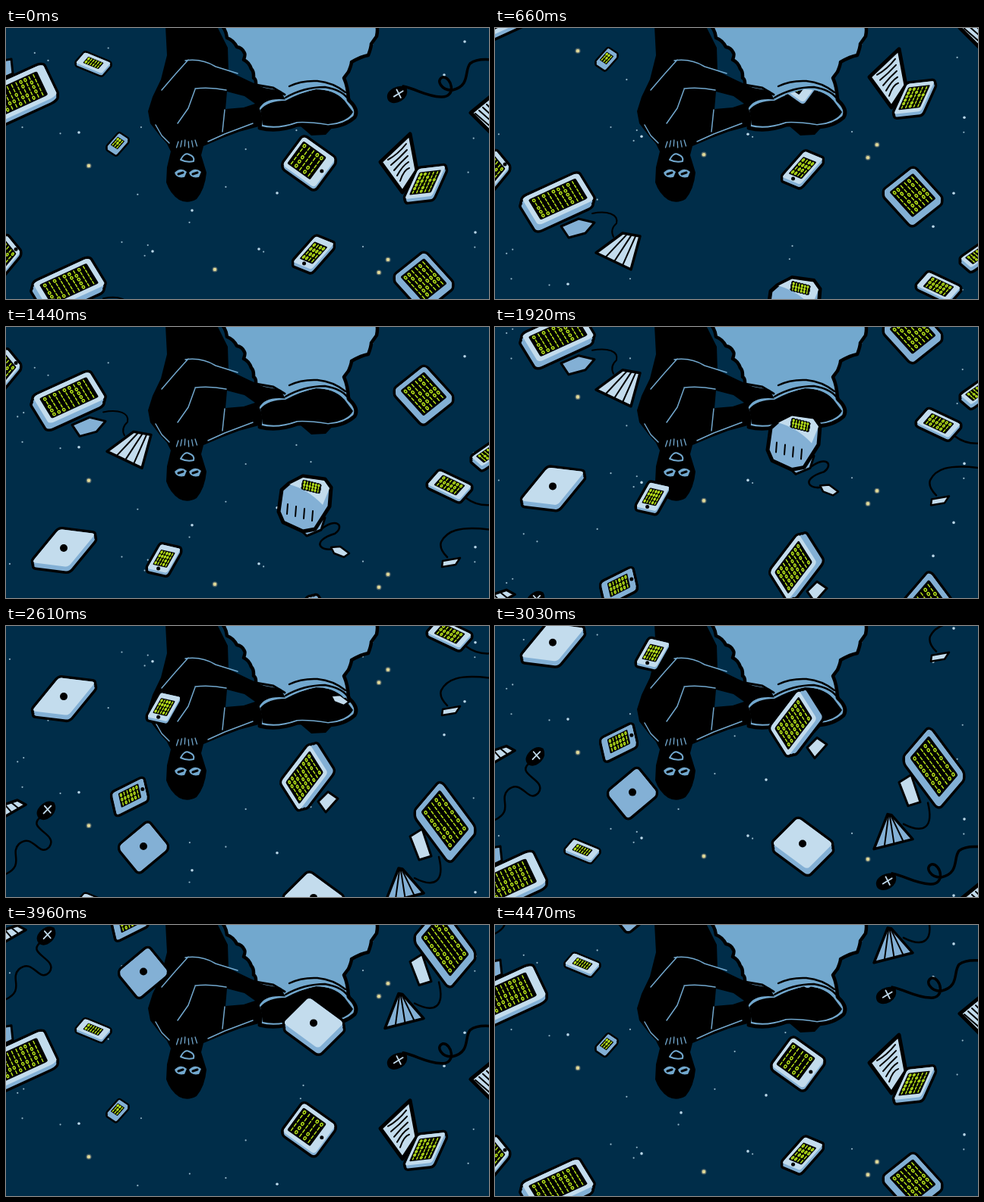
An HTML page with a canvas that plays this animation: 636x358 px, repeating every 4.5 s.

```html
<!DOCTYPE html>
<html lang="en">
<head>
<meta charset="utf-8">
<style>
html, body { margin: 0; width: 100%; height: 100%; overflow: hidden; background: #002d49; }
canvas { display: block; }
</style>
</head>
<body>
<canvas id="stage" width="636" height="358"></canvas>
<script>
const ctx = document.getElementById('stage').getContext('2d');
const LOOP = 4500, STEP = 30;
const ITEM_SPEED = 0.17, STAR_SPEED = 0.23;
const NIGHT = '#002d49', LIGHT = '#c3dced', BLUE = '#83b0d5', SACK = '#72a8ce', GREEN = '#b5e01a';
ctx.lineCap = ctx.lineJoin = 'round';

function seeded(seed) {
  return () => (seed = seed * 16807 % 2147483647) / 2147483647;
}
function fill(color, d) {
  ctx.fillStyle = color;
  ctx.fill(new Path2D(d));
}
function line(d, width = 2, color = '#000') {
  ctx.strokeStyle = color;
  ctx.lineWidth = width;
  ctx.stroke(new Path2D(d));
}
function shape(color, d, width = 4) {
  fill(color, d);
  line(d, width);
}
function dot(x, y, r, color = '#000') {
  ctx.fillStyle = color;
  ctx.beginPath();
  ctx.arc(x, y, r, 0, 7);
  ctx.fill();
}

// Builds a path in the square -1..1 spanned by the half axes u and v around (x, y)
function trace(x, y, u, v, build) {
  ctx.save();
  ctx.transform(...u, ...v, x, y);
  ctx.beginPath();
  build();
  ctx.restore();
}

function traceBits(rows, cols, w, h, shift) {
  const random = seeded(rows * 911 + cols * 37);
  for (let i = 0; i < rows * cols; i++) {
    const x = shift + w * ((i % cols * 2 + 1) / cols - 1) * 0.93;
    const y = h * ((Math.floor(i / cols) * 2 + 1) / rows - 1) * 0.93;
    const rx = w * 0.42 / cols, ry = h * 0.56 / rows;
    if (random() < 0.4) {
      ctx.moveTo(x + rx, y);
      ctx.ellipse(x, y, rx, ry, 0, 0, 2 * Math.PI);
    } else {
      ctx.moveTo(x, y - ry);
      ctx.lineTo(x, y + ry);
    }
  }
}

// A flat device: rounded face, side of the given depth, and a screen full of bits
function slab(x, y, u, v, { face = LIGHT, depth = [0, 3], bits, size = [0.8, 0.75], shift = 0, button, mark, edge = 4 } = {}) {
  const body = k => trace(x + depth[0] * k, y + depth[1] * k, u, v, () => ctx.roundRect(-1, -1, 2, 2, 0.18));
  const layers = [1, 0.5, 0];
  ctx.strokeStyle = '#000';
  ctx.lineWidth = edge * 2 - 1;
  for (const k of layers) { body(k); ctx.stroke(); }
  ctx.fillStyle = BLUE;
  for (const k of layers) { body(k); ctx.fill(); }
  ctx.fillStyle = face;
  ctx.fill();
  if (bits) {
    const [w, h] = size;
    trace(x, y, u, v, () => ctx.roundRect(shift - w, -h, 2 * w, 2 * h, 0.08));
    ctx.fillStyle = '#000';
    ctx.fill();
    trace(x, y, u, v, () => traceBits(...bits, w, h, shift));
    ctx.strokeStyle = GREEN;
    ctx.lineWidth = 1.5;
    ctx.stroke();
  }
  if (button) dot(x + u[0] * button[0] + v[0] * button[1], y + u[1] * button[0] + v[1] * button[1], 2.5);
  if (mark) dot(x, y, 5);
}

// Keyboard seen at an angle: stripes fan out from the short edge ab to the long edge dc
function keyboard(color, a, b, c, d) {
  const mix = (p, q, k) => [p[0] + (q[0] - p[0]) * k, p[1] + (q[1] - p[1]) * k];
  shape(color, `M${a}L${b}L${c}L${d}Z`, 3.5);
  for (const k of [0.27, 0.52, 0.76]) line(`M${mix(a, b, k)}L${mix(d, c, k)}`, 2);
}

function mouse(x, y, angle) {
  ctx.save();
  ctx.translate(x, y);
  ctx.rotate(angle);
  shape('#000', 'M-13 0Q-12 -9 0 -9Q12 -8 14 0Q11 9 0 9Q-12 8 -13 0Z', 2);
  line('M3 -6L2 6M-5 0L9 0', 1.8, LIGHT);
  ctx.restore();
}

// Each piece is drawn where it stands at the given moment of the loop
const pieces = [
  [0, () => {
    shape(BLUE, 'M-4 43L7 41L9 60L-4 66Z', 3);
    slab(8, 91, [50, -23], [10, 21], { depth: [0, 5], bits: [5, 13] });
  }],
  [0, () => slab(115, 46, [17, 7], [-6, 7], { bits: [2, 6], size: [0.6, 0.6], edge: 3 })],
  [0, () => slab(147, 152, [6, 4], [-8, 9], { face: BLUE, bits: [3, 3], size: [0.75, 0.6], edge: 3 })],
  [0, () => {
    line('M523 77C542 81 552 90 573 91C594 92 587 64 575 65C565 69 574 83 588 82C612 76 603 57 611 47Q620 40 640 42', 3.5);
    mouse(515, 88, -0.55);
  }],
  [0, () => slab(399, 177, [21, 15], [-14, 19], { bits: [5, 5], size: [0.72, 0.78], shift: -0.14, button: [0.8, 0] })],
  [0, () => {
    shape(LIGHT, 'M493 177L532 140L541 188L522 217Z', 5);
    for (let i = 0; i < 5; i++) line(`M${503 + i * 4} ${174 + i * 7}Q${516 + i * 2} ${167 + i * 5} ${527 + i} ${153 + i * 8}`);
    slab(552, 204, [18, -2], [-9, 20], { depth: [1, 4], bits: [6, 5] });
  }],
  [0, () => {
    shape(LIGHT, 'M612 112L640 89L640 140Z', 5);
    for (let i = 0; i < 4; i++) line(`M${618 + i * 5} ${113 - i * 4}L640 ${132 - i * 8}`);
  }],
  [0, () => slab(-4, 302, [9, 11], [-14, 17], { bits: [5, 4], button: [0.5, -0.9] })],
  [0, () => slab(405, 297, [12, 5], [-15, 17], { depth: [0, 4], bits: [4, 4], size: [0.72, 0.66], button: [0, 0.83] })],
  [660, () => {
    line('M128 245C148 241 163 246 160 258Q151 266 156 276');
    shape(BLUE, 'M87 262L110 252L131 257L119 271L97 277Z', 3);
    slab(83, 226, [37, -17], [11, 18], { depth: [-2, 8], bits: [5, 9], size: [0.84, 0.74] });
    keyboard(LIGHT, [168, 271], [191, 275], [179, 319], [133, 297]);
  }],
  [660, () => slab(550, 221, [20, -16], [19, 21], { face: BLUE, depth: [0, 4], bits: [6, 6], size: [0.78, 0.8] })],
  [1440, () => {
    line('M414 268C435 250 447 263 433 273C401 283 414 297 431 293', 2.5);
    shape(LIGHT, 'M428 291L440 290L452 299L445 304L432 299Z', 2.5);
    shape(BLUE, 'M386 266L420 252L415 268L396 276Z', 3);
    shape(BLUE, 'M372 207L391 197L420 201L428 212L426 237L407 267L391 270L365 258L359 244L363 215Z', 5);
    fill(LIGHT, 'M373 208L391 199L419 203L426 213L417 235Q397 214 373 208Z');
    slab(402, 211, [12, 3], [-1, 6], { face: '#000', depth: [0, 0], bits: [3, 6], size: [1, 1], edge: 1 });
    for (let i = 0; i < 4; i++) line(`M${371 + i * 11} ${234 + i * 3}l-1 13`);
  }],
  [1440, () => {
    line('M606 226Q620 237 640 235M640 268C595 262 580 270 573 284Q570 293 581 304', 2.5);
    shape(LIGHT, 'M575 309L598 305L592 314L574 317Z', 2.5);
    slab(584, 209, [21, 10], [-8, 9], { bits: [3, 6], size: [0.7, 0.75] });
  }],
  [1440, () => slab(640, 164, [20, -14], [7, 6], { depth: [0, 5], bits: [3, 8] })],
  [1440, () => slab(76, 292, [24, 3], [-18, 22], { depth: [1, 6], mark: true })],
  [1440, () => slab(208, 306, [13, 3], [-9, 16], { bits: [4, 5], size: [0.72, 0.62], button: [0, 0.82] })],
  [2610, () => {
    shape(LIGHT, 'M424 219L437 228L421 246L411 232Z', 3);
    slab(393, 200, [19, -25], [12, 19], { depth: [8, -2], bits: [5, 8], size: [0.84, 0.76] });
  }],
  [2610, () => slab(163, 224, [20, -10], [3, 13], { face: BLUE, bits: [3, 6], size: [0.66, 0.72], button: [0.84, 0] })],
  [2610, () => {
    keyboard(LIGHT, [-20, 242], [15, 230], [26, 236], [-12, 258]);
    line('M46 252C25 268 70 274 57 292C43 307 36 272 17 288C4 301 27 316 -3 329', 2.5);
    mouse(53, 244, -0.8);
  }],
  [2610, () => slab(181, 291, [19, -16], [13, 16], { face: BLUE, mark: true })],
  [2610, () => {
    line('M570 305C578 337 565 347 538 333', 2.5);
    keyboard(BLUE, [517, 320], [522, 321], [550, 353], [499, 366]);
    shape(LIGHT, 'M532 278L548 268L560 304L544 309Z', 3);
    slab(578, 257, [17, -20], [23, 31], { face: BLUE, depth: [0, 4], bits: [9, 5], size: [0.74, 0.84] });
  }],
  [3480, () => slab(405, 211, [23, 17], [-17, 17], { depth: [1, 8], mark: true })]
];

const random = seeded(4321);
const glowing = [[109, 182], [491, 323], [503, 306], [275, 319]];
const bright = [[333, 292], [357, 218], [245, 241], [193, 295], [604, 18], [577, 62], [618, 270], [96, 138]];
const faint = Array.from({ length: 26 }, () => [random() * 636, random() * 350]);
const tileTops = [0, 352, 682, 1035];

function drawStars(t) {
  const sow = (stars, r, color) => {
    for (const top of tileTops) {
      for (const [x, y] of stars) dot(x, y + top - STAR_SPEED * t, r, color);
    }
  };
  sow(faint, 1.1, '#93b6c8');
  sow(bright, 1.8, '#b9d7e8');
  sow(glowing, 3.6, '#4f6468');
  sow(glowing, 2.3, '#dfd898');
}

function drawThief() {
  fill('#000', `M210 -2L212 36L204 68L193 91L187 110L190 126L203 143L212 153L217 163L212 184L211 204
    Q216 219 228 227Q239 233 251 226Q262 213 264 191L257 168L260 156L286 145L307 137L333 130L337 110
    L362 96L369 89L362 82L338 78L320 70L293 57L292 26L278 -2Z`);
  fill(NIGHT, 'M291 84L314 90L328 100L313 105L289 107Z');
  line(`M240 42L223 61L205 82M236 43Q258 40 276 51L305 60M249 80Q270 78 290 82
    M249 81L240 106L226 126M288 108L285 137M197 128L205 142L215 152M266 150L288 140L325 126`, 1.5, SACK);
  for (let i = 0; i < 6; i++) line(`M${227 + i * 4.4} ${150 - (i % 3)}l${i - 2.5} 8`, 1.3, SACK);
  line('M230 174Q235 164 241 167Q249 170 247 176Q238 178 230 174Z', 2, SACK);
  for (const x of [230, 249]) {
    fill(SACK, `M${x - 8} 191Q${x} 183 ${x + 8} 190L${x + 5} 197Q${x - 6} 199 ${x - 8} 191Z`);
    line(`M${x - 3} 193L${x + 3} 191`, 3);
  }
}

const RIM = 'Q345 96 368 96Q388 85 408 81Q432 81 445 95L457 111';

function drawMouth() {
  fill('#000', 'M388 130L402 142L421 141L432 129Z');
  shape(SACK, `M331 106Q339 89 368 92Q392 77 420 78Q446 82 452 96Q465 108 459 118
    Q446 130 424 131Q398 127 384 128Q357 138 334 132Q337 118 331 106Z`, 5);
  fill('#000', `M335 108${RIM}Q450 124 424 127Q400 123 383 124Q357 133 338 128Z`);
}

// Ragged cloth edge stepping along a few key points
function ragged(points) {
  return points.map(([x, y], i) => {
    if (!i) return `L${x} ${y}`;
    const [px, py] = points[i - 1];
    return `Q${(px + x) / 2 + 2} ${(py + y) / 2 - 3} ${x} ${y}`;
  }).join('');
}
const leftEdge = ragged([[284, -3], [291, 13], [304, 25], [314, 33], [313, 42], [323, 54], [326, 66], [329, 75]]);
const rightEdge = ragged([[488, -3], [488, 11], [481, 21], [477, 36], [455, 45], [451, 58], [445, 66], [451, 94]]);

function drawSack() {
  const left = 'M' + leftEdge.slice(1), right = 'M' + rightEdge.slice(1);
  fill(SACK, `${left}L340 79L362 83L368 95Q388 85 408 81Q432 81 445 95L451 94L445 66L455 45L477 36L488 11L488 -3Z`);
  line(left, 4.5);
  line(right, 4.5);
  line('M329 75L352 79L367 88', 3);
  line('M373 77Q389 69 410 70Q431 72 447 85', 2.5);
  line('M368 92Q392 78 420 78Q444 82 452 96', 2.5);
}

function drawPieces(t) {
  for (const [moment, draw] of pieces) {
    for (const start of [moment, moment + LOOP]) {
      const shift = ITEM_SPEED * (start - t);
      if (Math.abs(shift) > 400) continue;
      ctx.save();
      ctx.translate(0, shift);
      draw();
      ctx.restore();
    }
  }
}

function frame(now) {
  const t = Math.floor(now % LOOP / STEP) * STEP;
  ctx.fillStyle = NIGHT;
  ctx.fillRect(0, 0, 636, 358);
  drawStars(t);
  drawThief();
  drawMouth();
  drawPieces(t);
  drawSack();
}

const began = performance.now();
function tick() {
  frame(performance.now() - began);
  requestAnimationFrame(tick);
}
tick();
</script>
</body>
</html>
```
